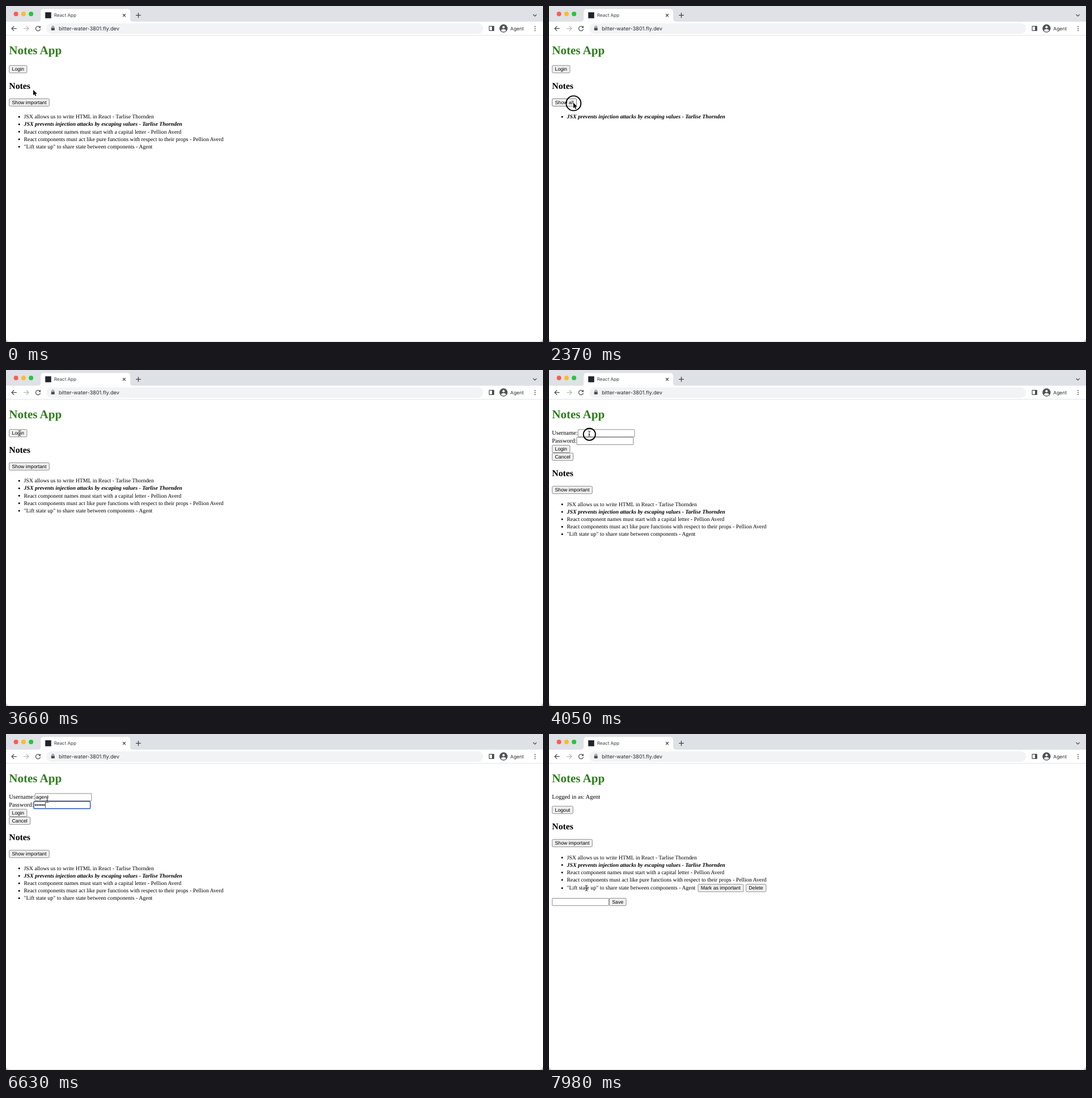
Animation, 947 px wide and 592 px high, one loop 8 s. Source, as an HTML page:

```html
<!DOCTYPE html>
<html lang="en">
<head>
<meta charset="utf-8">
<title>Notes App</title>
<style>
html, body { margin: 0; width: 100%; height: 100%; overflow: hidden; background: #fff; }
svg { display: block; width: 947px; height: 592px; }
text { white-space: pre; text-rendering: geometricPrecision; }
.ui { font-family: Inter, "Open Sans", sans-serif; fill: #3c4043; }
.serif { font-family: "Liberation Serif", "Times New Roman", serif; }
.sans { font-family: "Liberation Sans", Arial, sans-serif; font-size: 8.768px; }
.h1 { font-size: 21.04px; font-weight: bold; fill: #2c7f1a; }
.h2 { font-size: 15.78px; font-weight: bold; }
.p { font-size: 10.52px; }
.li { font-size: 9.865px; }
.strong { font-weight: bold; font-style: italic; }
</style>
</head>
<body>
<svg viewBox="0 0 947 592" xmlns="http://www.w3.org/2000/svg">
  <rect width="947" height="592" fill="#c6c6c6"/>
  <rect y="-10" width="947" height="601.4" rx="6.5" fill="#fff"/>

  <!-- tab strip -->
  <rect width="947" height="27.6" fill="#dee1e6"/>
  <circle cx="17.6" cy="14" r="4" fill="#fb5b54"/>
  <circle cx="30.9" cy="14" r="4" fill="#f9bb2f"/>
  <circle cx="44.1" cy="14" r="4" fill="#27c53f"/>
  <path d="M56 27.7Q61.2 27.7 61.2 22.5V10.6Q61.2 5.3 66.5 5.3H213.7Q219 5.3 219 10.6V22.5Q219 27.7 224.2 27.7Z" fill="#fff"/>
  <rect x="69.2" y="11.1" width="10.5" height="10.5" fill="#20232a"/>
  <text class="ui" x="84.8" y="19.3" font-size="8">React App</text>
  <g fill="none" stroke="#3c4043" stroke-width="1.1">
    <path d="M206 14l4.8 4.8M210.8 14l-4.8 4.8"/>
    <path d="M229 16.4h8.8M233.4 12v8.8" stroke-width="1.25"/>
    <path d="M929.6 14.8l3 3l3-3" stroke-width="1.2"/>
  </g>

  <!-- toolbar -->
  <path d="M0 51.7H947" stroke="#d8dade" stroke-width=".8"/>
  <g fill="none" stroke="#4b4f53" stroke-width="1.25">
    <path d="M18.8 39.7H10.2M14.2 35.5L10 39.7l4.2 4.2"/>
    <path d="M31.2 39.7h8.6M35.8 35.5L40 39.7l-4.2 4.2" stroke="#b5b7ba"/>
    <path d="M59.8 37.2A4.1 4.1 0 1 0 60.5 40.7"/>
    <path d="M61 34.8v3.9h-3.9Z" fill="#4b4f53" stroke="none"/>
  </g>
  <rect x="71" y="30.5" width="770.5" height="18.4" rx="9.2" fill="#f1f3f4"/>
  <rect x="79.7" y="38.2" width="6" height="4.9" rx=".7" fill="#4b4f53"/>
  <path d="M81 38.4V37a1.7 1.7 0 0 1 3.4 0v1.4" fill="none" stroke="#4b4f53" stroke-width=".9"/>
  <text class="ui" x="93" y="42.8" font-size="9.17" style="fill:#2b2e31">bitter-water-3801.fly.dev</text>
  <rect x="852.1" y="35.7" width="8.2" height="7.7" rx=".4" fill="none" stroke="#4b4f53" stroke-width="1.2"/>
  <rect x="857" y="35.7" width="3.5" height="7.7" fill="#4b4f53"/>
  <circle cx="877.4" cy="39.5" r="7.2" fill="#4f5357"/>
  <circle cx="877.4" cy="37.3" r="2.1" fill="#fff"/>
  <path d="M873 43.4Q873.6 40.8 877.4 40.8T881.8 43.4Q880 45.3 877.4 45.3T873 43.4Z" fill="#fff"/>
  <text class="ui" x="889.3" y="42.6" font-size="8.5" style="fill:#2b2e31">Agent</text>
  <g fill="#4b4f53">
    <circle cx="933" cy="36.2" r=".95"/><circle cx="933" cy="39.7" r=".95"/><circle cx="933" cy="43.2" r=".95"/>
  </g>

  <text class="serif h1" x="5.26" y="85.2">Notes App</text>
  <g id="page"></g>
  <g id="pointer"></g>
</svg>
<script>
const LOOP = 8000, TICK = 30, LEFT = 5.26, BTN_H = 13.8, ROW = 13.15;
const notes = [
  "JSX allows us to write HTML in React - Tarlise Thornden",
  "JSX prevents injection attacks by escaping values - Tarlise Thornden",
  "React component names must start with a capital letter - Pellion Averd",
  "React components must act like pure functions with respect to their props - Pellion Averd",
  "\"Lift state up\" to share state between components - Agent"
];
const KEY_TIMES = [0, 1, 2, 3, 4].map(i => 4500 + 110 * i);
const DOT_TIMES = [5370, 5460, 5700, 6030, 6090, 6240];

// start, end, target x, target y, sideways bend
const moves = [
  [480, 720, 48, 175, 0],
  [900, 960, 48, 172.3, 0],
  [1770, 1830, 43, 170.6, 0],
  [2640, 3000, 24, 111.3, 0],
  [3720, 3900, 71, 112.5, 0],
  [4290, 4290, 74, 115.3, 0],
  [6630, 6900, 26.5, 139, 0],
  [7650, 7980, 66, 271.5, 28]
];
// start, end, radius
const clicks = [[1200, 1320, 13], [2370, 2460, 13], [3600, 3660, 13], [4050, 4140, 10.6], [7140, 7200, 13]];

const within = (t, a, b) => t >= a && t < b;
const count = (times, t) => times.filter(k => t >= k).length;
const ease = p => p * p * (3 - 2 * p);
const text = (cls, x, y, s) => `<text class="${cls}" x="${x}" y="${y}">${s}</text>`;

function cursorAt(t) {
  let x = 48, y = 147.8;
  for (const [a, b, tx, ty, bend] of moves) {
    if (t < a) break;
    const p = ease(Math.min(1, (t - a + TICK) / (b - a + TICK)));
    x += (tx - x) * p + bend * Math.sin(Math.PI * p);
    y += (ty - y) * p;
  }
  return { x, y, hidden: within(t, 4500, 6630) };
}

const viewAt = t => t < 3690 ? "home" : t < 7320 ? "form" : "user";
const shiftOf = view => ({ home: 0, form: 41.43, user: 22.36 })[view];

function overText(t, { x, y }) {
  const view = viewAt(t + TICK), dy = shiftOf(view);
  if (view === "form" && y > 104 && y < 132 && x < 150) return true;
  if (x < 43 && y > 134 + dy && y < 149 + dy) return true;
  return x > 31 && x < 258 && y > 189 + dy && y < 254 + dy;
}

function button(label, x, y, w, env) {
  const { x: cx, y: cy } = env.cursor;
  const hot = env.arrow && cx >= x && cx <= x + w && cy >= y && cy <= y + BTN_H;
  const fill = !hot ? "#efefef" : env.click ? "#f5f5f5" : "#e0e0e2";
  return `<rect x="${x + .35}" y="${y + .35}" width="${w - .7}" height="${BTN_H - .7}" rx="1.7" fill="${fill}" stroke="${hot ? "#505050" : "#6c6c6c"}" stroke-width=".75"/>`
    + text("sans", x + 5.26, y + 9.9, label);
}

function field(x, y, value, caret) {
  const focused = caret !== null;
  const style = focused ? 'stroke="#2050bd" stroke-width="1.4" rx="1.5"' : 'stroke="#707070" stroke-width=".8" rx=".4"';
  let s = `<rect x="${x + .5}" y="${y + .5}" width="99.6" height="${BTN_H - 1}" fill="#fff" ${style}/>`
    + text("sans", x + 2, y + 9.9, value);
  if (focused) s += `<rect x="${x + 2 + caret}" y="${y + 2}" width=".75" height="9.8"/>`;
  return s;
}

function list(top, only, user, env) {
  const items = only ? [notes[1]] : notes;
  return items.map((s, i) => {
    const y = top + i * ROW + (user && i === 4 ? 1.2 : 0);
    let row = `<circle cx="23.2" cy="${y - 2.9}" r="1.5"/>`
      + text("serif li" + (s === notes[1] ? " strong" : ""), 31.5, y, s);
    if (user && i === 4)
      row += button("Mark as important", 262.5, y - 9.9, 80.8, env) + button("Delete", 347, y - 9.9, 36.2, env);
    return row;
  }).join("");
}

function login(t, env) {
  const typed = count(KEY_TIMES, t), dots = count(DOT_TIMES, t);
  const nameCaret = within(t, 4140, 5130) ? Math.min(typed, 4) * 4.88 + (typed > 4 ? 2.44 : 0) : null;
  const passCaret = within(t, 5130, 7140) ? dots * 3.07 : null;
  return text("serif p", LEFT, 114.3, "Username:") + text("serif p", LEFT, 128.1, "Password:")
    + field(50.8, 104.4, "agent".slice(0, typed), nameCaret)
    + field(48.5, 118.2, "•".repeat(dots), passCaret)
    + button("Login", LEFT, 132.1, 32, env) + button("Cancel", LEFT, 145.9, 37.8, env);
}

function page(t, env) {
  const view = viewAt(t), dy = shiftOf(view), only = within(t, 1260, 2460);
  let s = "";
  if (view === "home") s += button("Login", LEFT, 104.4, 32, env);
  if (view === "form") s += login(t, env);
  if (view === "user") {
    s += text("serif p", LEFT, 114, "Logged in as: Agent") + button("Logout", LEFT, 126.8, 37.3, env)
      + field(LEFT, 289, "", null) + button("Save", 106, 289, 30.4, env);
  }
  s += text("serif h2", LEFT, 146 + dy, "Notes");
  s += only ? button("Show all", LEFT, 163 + dy, 43.7, env) : button("Show important", LEFT, 163 + dy, 71.4, env);
  return s + list(198.2 + dy, only, view === "user", env);
}

function pointer({ cursor, arrow, click }) {
  if (cursor.hidden) return "";
  const at = `transform="translate(${cursor.x} ${cursor.y})"`;
  let s = click ? `<circle ${at} cx=".3" cy=".8" r="${click[2]}" fill="none" stroke="#000" stroke-width="1.9"/>` : "";
  if (arrow)
    return s + `<path ${at} d="M0 0V9.5L2.2 7.5L3.7 11L5.3 10.3L3.8 6.9H6.8Z" stroke="#fff" stroke-width="1" stroke-linejoin="round" paint-order="stroke"/>`;
  const beam = "M-2.4-4.8Q0-4.8 0-3.6Q0-4.8 2.4-4.8M0-3.6V3.6M-2.4 4.8Q0 4.8 0 3.6Q0 4.8 2.4 4.8M-1.5 1.4H1.5";
  return s + `<g ${at} fill="none"><path d="${beam}" stroke="#fff" stroke-width="1.9"/><path d="${beam}" stroke="#111" stroke-width=".9"/></g>`;
}

const pageEl = document.getElementById("page"), pointerEl = document.getElementById("pointer");
let last = -1;

function render(now) {
  const t = Math.floor((now % LOOP) / TICK + 1e-6) * TICK;
  if (t !== last) {
    last = t;
    const cursor = cursorAt(t);
    const env = {
      cursor,
      arrow: !cursor.hidden && !overText(t, cursor),
      click: clicks.find(([a, b]) => within(t, a, b))
    };
    pageEl.innerHTML = page(t, env);
    pointerEl.innerHTML = pointer(env);
  }
}

const start = performance.now();
function frame() {
  render(performance.now() - start);
  requestAnimationFrame(frame);
}
render(0);
requestAnimationFrame(frame);
</script>
</body>
</html>
```
